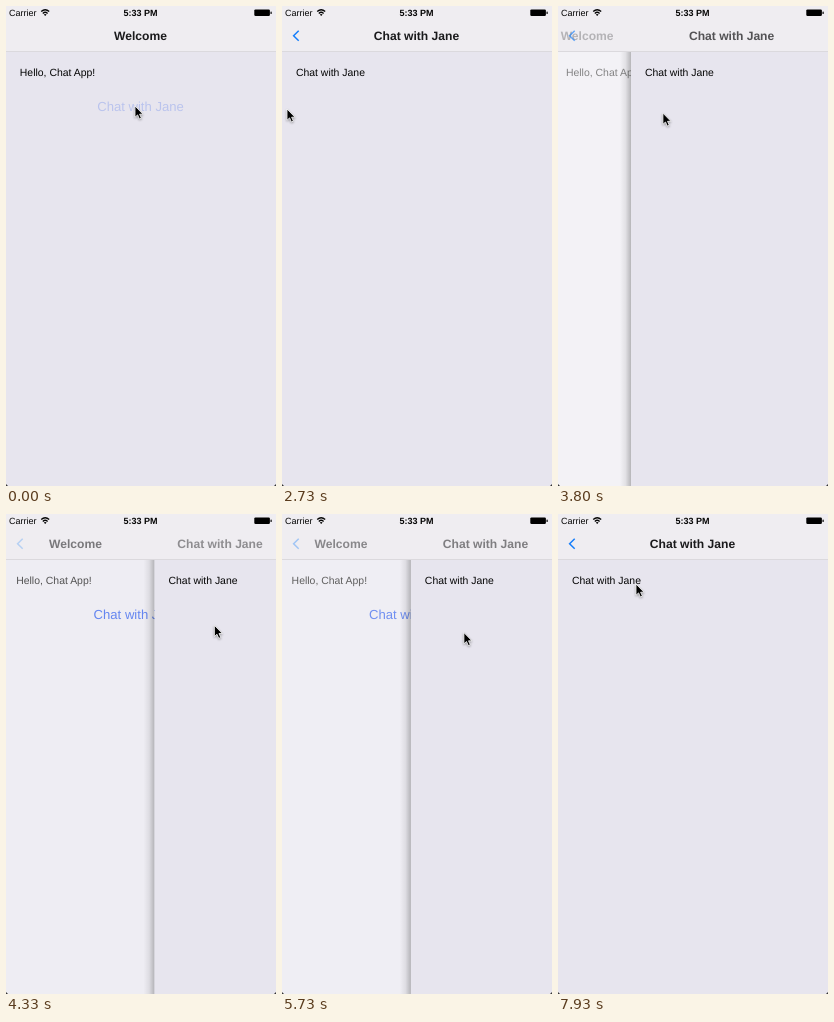
Recreate the animation shown at these times as an HTML page. Size 270x480 px, loop 8000 ms.

```html
<!DOCTYPE html>
<html lang="en">
<head>
<meta charset="utf-8">
<title>Swipe back</title>
<style>
  html, body { margin: 0; width: 100%; height: 100%; overflow: hidden; background: #fff; }
  svg { display: block; width: 100%; height: 100%; }
  text {
    font-family: "Liberation Sans", Arial, sans-serif;
    text-rendering: geometricPrecision;
    fill: #050505;
  }
  .status { font-size: 9px; }
  .title { font-size: 12.1px; font-weight: 700; text-anchor: middle; fill: #1a1a1c; }
  .body { font-size: 10.45px; }
  .link { font-size: 13.1px; text-anchor: middle; fill: #1f50ea; }
  .clock { font-weight: 700; text-anchor: middle; }
  .paper { fill: #e7e5ee; }
  #cursor { filter: drop-shadow(0 1px 1px rgba(0, 0, 0, .35)); }
</style>
</head>
<body>
<svg viewBox="0 0 270 480">
  <defs>
    <linearGradient id="shade">
      <stop offset="0" stop-color="#000" stop-opacity="0"/>
      <stop offset=".5" stop-color="#000" stop-opacity=".07"/>
      <stop offset="1" stop-color="#000" stop-opacity=".25"/>
    </linearGradient>
  </defs>

  <rect width="270" height="480" fill="#fff"/>
  <g id="home">
    <rect class="paper" y="46" width="290" height="434"/>
    <text class="body" x="13.8" y="69.7">Hello, Chat App!</text>
    <text class="link" id="link" x="134.5" y="105">Chat with Jane</text>
  </g>
  <g id="chat">
    <rect x="-11" y="46" width="11" height="434" fill="url(#shade)"/>
    <rect class="paper" y="46" width="270" height="434"/>
    <text class="body" x="13.9" y="69.7">Chat with Jane</text>
  </g>

  <rect width="270" height="46" fill="#efedf1"/>
  <rect y="45" width="270" height=".7" fill="#d3d1d6"/>
  <text class="title" id="homeTitle" y="34.2">Welcome</text>
  <text class="title" id="chatTitle" y="34.2">Chat with Jane</text>
  <path id="back" d="M16.7 24.8L11.6 29.8L16.7 34.8" fill="none" stroke="#157efb" stroke-width="1.5"/>

  <text class="status" x="3" y="9.9">Carrier</text>
  <path d="M35.2 5.6Q39.2 1.9 43.2 5.6M36.8 7.4Q39.2 5.2 41.6 7.4" fill="none" stroke="#050505" stroke-width="1.3"/>
  <path d="M37.8 8.5Q39.2 7.4 40.6 8.5L39.2 10Z"/>
  <text class="status clock" x="134.5" y="9.9">5:33 PM</text>
  <rect x="248.3" y="3.4" width="15.6" height="6.6" rx="1.2"/>
  <rect x="264.5" y="5.4" width="1.2" height="2.6" rx=".6"/>
  <path d="M0 478V480H2ZM270 478V480H268Z" fill="#333"/>

  <path id="cursor" d="M0 0V11.2L2.6 8.9L4.4 13L6.4 12.1L4.6 8.2H8Z" fill="#000" stroke="#fff" stroke-width=".8"/>
</svg>
<script>
const LOOP = 8000, WIDTH = 270;
const PUSH = 50, RELEASE = 5800, PRESS = 7460, PUSH_AGAIN = 7520;

const glide = u => (1 - Math.cos(Math.PI * u)) / 2;
const pull = u => u ** 1.7;

// Pointer stops; "page" is how far the finger has dragged the page.
const STOPS = [
  { at: 0, x: 129, y: 100 },
  { at: 930, x: 129, y: 100 },
  { at: 1760, x: 16, y: 27 },
  { at: 2560, x: 5, y: 103 },
  { at: 2780, x: 5, y: 103 },
  { at: 4400, x: 224, y: 112, page: 160, ease: pull },
  { at: 5330, x: 17, y: 127, page: 61 },
  { at: RELEASE, x: 233, y: 116, page: 150, ease: pull },
  { at: 6930, x: 101, y: 75 },
  { at: 7270, x: 152, y: 100 },
  { at: PUSH_AGAIN, x: 152, y: 100 },
  { at: 7930, x: 78, y: 70 },
  { at: LOOP, x: 78, y: 70 }
];

const el = id => document.getElementById(id);
const [home, chat, link, homeTitle, chatTitle, back, cursor] =
  ["home", "chat", "link", "homeTitle", "chatTitle", "back", "cursor"].map(el);
const clamp = v => Math.min(1, Math.max(0, v));
const mix = (a, b, u) => a + (b - a) * u;

function pose(t) {
  const i = STOPS.findIndex(stop => stop.at > t);
  const a = STOPS[i - 1], b = STOPS[i];
  const u = (b.ease || glide)((t - a.at) / (b.at - a.at));
  return {
    x: mix(a.x, b.x, u),
    y: mix(a.y, b.y, u),
    page: mix(a.page || 0, b.page || 0, u)
  };
}

// Distance left on an overdamped spring, from 1 to 0, snapping at rest.
function spring(ms) {
  const rest = Math.min(1, 1.22 * Math.exp(-0.0121 * ms));
  return rest < 0.012 ? 0 : rest;
}

function pageOffset(t, dragged) {
  if (t < 2000) return WIDTH * spring(t - PUSH);
  if (t < RELEASE) return dragged;
  if (t < PRESS) return mix(WIDTH, pose(RELEASE).page, spring(t - RELEASE));
  return WIDTH * spring(t - PUSH_AGAIN);
}

const move = (node, x, y = 0) => node.setAttribute("transform", `translate(${x} ${y})`);
const fade = (node, value) => node.setAttribute("opacity", clamp(value));

function draw(t) {
  const { x, y, page } = pose(t);
  const offset = pageOffset(t, page), p = offset / WIDTH;
  const sincePress = t < PRESS ? t : t - PRESS;

  move(chat, offset);
  chat.setAttribute("visibility", p < 1 ? "visible" : "hidden");
  move(home, -8 * (1 - p));
  fade(home, 0.3 + 0.7 * p);
  fade(link, mix(0.22, 1, clamp((sincePress - 100) / 150)));
  move(homeTitle, mix(-10, 134.5, p));
  fade(homeTitle, p);
  move(chatTitle, mix(134.5, 279, p));
  fade(chatTitle, 1 - p);
  fade(back, 1 - 1.35 * p);
  move(cursor, x, y);
}

const start = performance.now();
function tick() {
  draw((performance.now() - start) % LOOP);
  requestAnimationFrame(tick);
}
tick();
</script>
</body>
</html>
```
